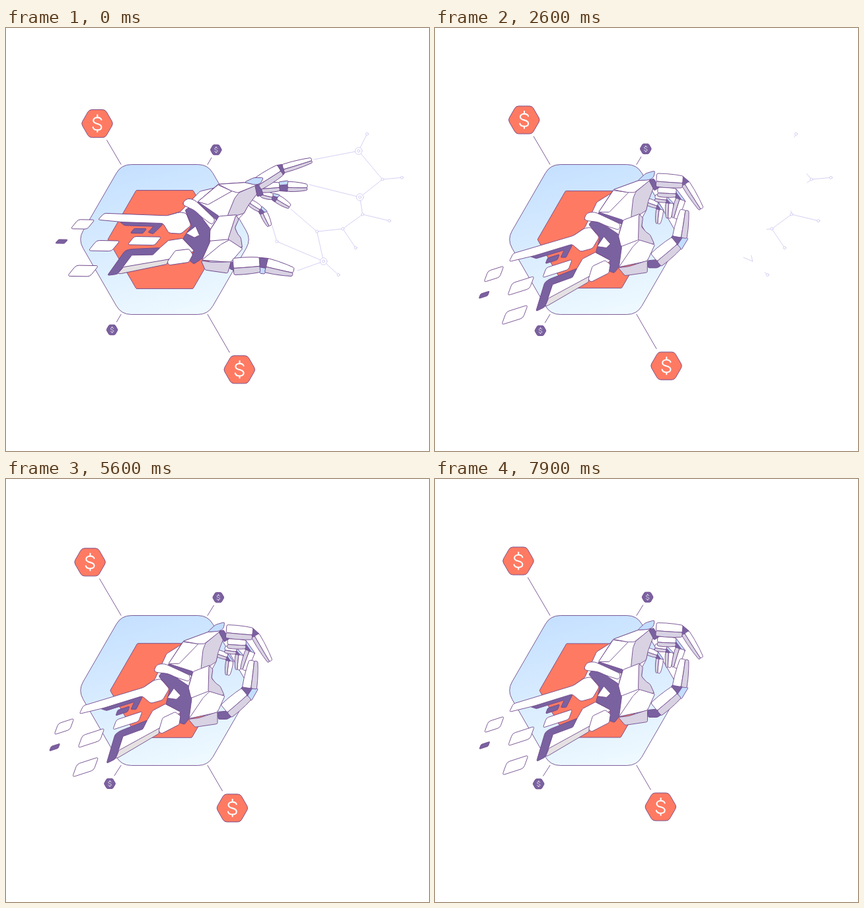
Animation of 640x640 px, one loop 8000 ms. Source, as an HTML page:

```html
<!DOCTYPE html>
<html lang="en">
<head>
<meta charset="utf-8">
<title>Robot hand</title>
<style>
html, body { margin: 0; width: 100%; height: 100%; overflow: hidden; background: #fff; }
svg { display: block; width: 100%; height: 100%; stroke-linejoin: round; stroke-linecap: round; }
.ink { stroke: #70498c; stroke-width: .9; }
.net { stroke: #cbc4f0; stroke-width: .8; fill: #fff; }
</style>
</head>
<body>
<svg id="stage" viewBox="0 0 640 640">
  <defs>
    <linearGradient id="sky" x1=".3" y1="0" x2=".6" y2="1">
      <stop offset="0" stop-color="#c5e0ff"/>
      <stop offset="1" stop-color="#eef9ff"/>
    </linearGradient>
  </defs>
</svg>
<script>
const LOOP = 8000;
const WHITE = '#fff', GRAY = '#d8d2e3', PALE = '#e5e1e2', PURPLE = '#7a61a0', BLUE = '#c3ddff', ORANGE = '#ff7a62';
const stage = document.getElementById('stage');

function set(node, attrs) {
  for (const key in attrs) node.setAttribute(key, attrs[key]);
}
function add(parent, tag, attrs = {}) {
  const node = document.createElementNS('http://www.w3.org/2000/svg', tag);
  set(node, attrs);
  return parent.appendChild(node);
}
const show = (node, visible) => set(node, { visibility: visible ? 'visible' : 'hidden' });

const mix = (a, b, k) => a + (b - a) * k;
const mixPoint = (p, q, k) => [mix(p[0], q[0], k), mix(p[1], q[1], k)];
const span = (t, start, length) => Math.min(1, Math.max(0, (t - start) / length));
const ease = k => (1 - Math.cos(Math.PI * k)) / 2;

// Eased value through [time, value] keys
function track(t, ...keys) {
  return keys.slice(1).reduce((value, [t1, v1], i) => {
    const [t0, v0] = keys[i];
    return t < t0 ? value : mix(v0, v1, ease(span(t, t0, t1 - t0)));
  }, keys[0][1]);
}

// Point reached by walking along a heading (degrees) and then sideways, clockwise positive
function step([x, y], heading, along, side = 0) {
  const a = heading * Math.PI / 180, c = Math.cos(a), s = Math.sin(a);
  return [x + along * c - side * s, y + along * s + side * c];
}

// Closed polygon with softened corners
function outline(points, r = 2) {
  const n = points.length;
  const text = p => p.map(v => v.toFixed(2)).join();
  return points.map((p, i) => {
    const toward = q => mixPoint(p, q, Math.min(r / (Math.hypot(q[0] - p[0], q[1] - p[1]) || 1), .5));
    const enter = toward(points[(i + n - 1) % n]), leave = toward(points[(i + 1) % n]);
    return `${i ? 'L' : 'M'}${text(enter)}Q${text(p)} ${text(leave)}`;
  }).join('') + 'Z';
}
const hexagon = (cx, cy, radius) => [180, 240, 300, 0, 60, 120].map(a => step([cx, cy], a, radius));

// Backdrop
add(stage, 'path', { d: outline(hexagon(240, 320, 131), 15), fill: 'url(#sky)', class: 'ink' });
const core = add(stage, 'path', { fill: ORANGE, class: 'ink' });

// Coins drift along spokes anchored at the big hexagon
function coin(from, to, anchor, gap, scale, fill) {
  const spoke = add(stage, 'line', { x1: anchor[0], y1: anchor[1], class: 'ink' });
  const group = add(stage, 'g');
  add(group, 'path', { d: outline(hexagon(0, 0, 24.3 * scale), 4 * scale), fill, class: 'ink' });
  add(group, 'path', {
    d: 'M6.4-5.7C5.4-8 3-9.2.3-9.2C-3.6-9.2-5.8-7-5.8-4.6C-5.8-1.6-3.6-.7.3.3C4.2 1.3 6.4 2.6 6.4 5.3C6.4 8 4 9.7.3 9.7C-3 9.7-5.6 8.2-6.4 5.6M.3-13V-9.2M.3 9.7V12.7',
    fill: 'none', stroke: '#fff', 'stroke-width': 2.1, transform: `scale(${scale})`
  });
  return k => {
    const [x, y] = mixPoint(from, to, k);
    const [x2, y2] = step([x, y], anchor[1] > y ? 60 : 240, gap * (anchor[0] > x === anchor[1] > y ? 1 : 0));
    const end = x2 === x ? step([x, y], anchor[1] > y ? 120 : 300, gap) : [x2, y2];
    set(group, { transform: `translate(${x} ${y})` });
    set(spoke, { x2: end[0], y2: end[1] });
  };
}
const coins = [
  coin([138, 144.6], [126, 124], [174, 206.3], 29, 1, ORANGE),
  coin([353.2, 516.8], [341.3, 496], [305, 433.3], 30, 1, ORANGE),
  coin([317.8, 184.3], [321.6, 178.8], [305, 206.5], 14, .36, PURPLE),
  coin([160.5, 456.7], [156.7, 461.3], [174, 433.3], 14, .36, PURPLE)
];

// Network: [x, y, depth, ringed]; depth 0 sits at the fingertips
const nodes = {
  index: [466, 199, 0], middle: [459, 237, 0], ring: [431, 274, 0], pinky: [402.5, 298, 0], thumb: [441, 367, 0],
  a: [533.5, 186, 1, 1], b: [535.5, 256, 1, 1], c: [470.5, 308, 1], d: [480.5, 353, 1, 1], e: [409.8, 323, 1],
  f: [546.3, 160.3, 2], g: [569.5, 229, 2], h: [539.5, 282, 2], i: [509.6, 303.8, 2], j: [503, 373.5, 2],
  k: [599, 226.3, 3], l: [580, 291.7, 3], m: [529, 332.6, 3]
};
const net = add(stage, 'g', { class: 'net' });
const links = 'index-a middle-b ring-c pinky-e thumb-d a-f a-g b-g b-h c-i c-d e-d d-j g-k h-l i-m h-i'
  .split(' ').map(pair => {
    const [p, q] = pair.split('-').map(name => nodes[name]);
    return { p, q, line: add(net, 'line', { x2: q[0], y2: q[1] }) };
  });
const dots = Object.values(nodes).filter(node => node[2]).map(([x, y, depth, ringed]) => {
  const group = add(net, 'g');
  if (ringed) add(group, 'circle', { r: 5.3 });
  add(group, 'circle', { r: 2 });
  return { x, y, depth, group };
});
function drawNet(t) {
  for (const { p, q, line } of links) {
    const k = span(t, 1690 + 500 * p[2], 510);
    const [x1, y1] = mixPoint(p, q, k);
    set(line, { x1, y1 });
    show(line, k < 1);
  }
  for (const { x, y, depth, group } of dots) {
    const scale = 1 - ease(span(t, 1550 + 650 * depth, 400));
    set(group, { transform: `translate(${x} ${y}) scale(${scale})` });
    show(group, scale > 0);
  }
}

// The hand is drawn in its grasping pose; REACH places that drawing for the open pose
const PIVOT = [197, 380.5], REACH = { x: 212, y: 342.25, turn: 19 };
const WRIST = [265, 300], BEND = -2.5;
const rotateAbout = (p, center, angle) => step(center, angle, p[0] - center[0], p[1] - center[1]);
const toHandSpace = ([x, y]) =>
  rotateAbout([x - REACH.x + PIVOT[0], y - REACH.y + PIVOT[1]], PIVOT, -REACH.turn);
const toPalmSpace = p => rotateAbout(toHandSpace(p), WRIST, -BEND);

const hand = add(stage, 'g', { class: 'ink' });
const movers = [];
function part(parent, fill, points, r) {
  const list = points.split(' ').map(pair => pair.split(',').map(Number));
  return add(parent, 'path', { fill, d: outline(list, r) });
}

// Slanted plate along the forearm
function plate(fill, grasp, reach, width, height) {
  const path = add(hand, 'path', { fill });
  const open = toHandSpace(reach);
  movers.push(grip => {
    const center = mixPoint(open, grasp, grip);
    const corner = (u, v) => step(step(center, -18, u * width / 2), 110, v * height / 2);
    set(path, { d: outline([corner(-1, -1), corner(1, -1), corner(1, 1), corner(-1, 1)], height / 5) });
  });
}
plate(WHITE, [88, 374], [116, 297], 25, 18);
plate(PURPLE, [73.5, 405.5], [84, 323], 14, 7.5);
plate(WHITE, [129, 391.5], [148.5, 329.5], 35, 20);
plate(WHITE, [120, 435.5], [116.5, 367.5], 34, 21);

// Forearm
part(hand, WHITE, '208,315 225,303 243,264 262,252 270,246 258,268 244,282 246,300 232,305');
part(hand, PURPLE, '143,347 204,327 206,330 197,348 189,348 194,337 152,350', 1);
plate(PURPLE, [176.5, 350.5], [200.5, 307], 19, 9);
part(hand, WHITE, '111,355 117,342.5 208,315 224,304 234,302 247,317 237,334 219,339 206,328 148,346', 3);
part(hand, PURPLE, '152,430 165,386 172,381 215,364 207,379 177,389 166,423', 3);
part(hand, WHITE, '167,420 177,389 207,378 214,364 222,350 241,340 265,352 234,376', 1);
part(hand, PALE, '166,422 171,410 233,376 231,385 170,421', 1);
plate(WHITE, [184, 365], [209.5, 322], 41, 16);

// Wrist
part(hand, PURPLE, '231,298 246,280 256,274 285,290 277,315 281,332 298,330 277,362 270,371 262,368 264,352 242,340 248,317');
part(hand, WHITE, '254,316 264,327 258,333 244,331', 1);
part(hand, WHITE, '264,290 281,297 277,313 259,301', 1);
part(hand, WHITE, '224,288 229,280 240,279 262,289 279,297 277,306 258,300 245,294 226,292', 4);
part(hand, WHITE, '231,381 237,361 256,352 264,358 262,371 235,385');

const palm = add(hand, 'g');

// Two bones and a joint; the clockwise side of each bone is shaded
function finger({ reach, grasp, lengths, open, closed, girth, cap }) {
  const [nearLength, gap, farLength] = lengths, [nearWidth, farWidth] = girth;
  const base = toPalmSpace(reach);
  const rest = open.map(a => a - REACH.turn - BEND);
  const [joint, knuckle, ...shells] = [PURPLE, BLUE, WHITE, GRAY, WHITE, GRAY]
    .map(fill => add(palm, 'path', { fill }));
  const strip = (p, heading, length, w0, w1, from, to) => {
    const edge = side => [0, .35, .7, 1].map(u =>
      step(p, heading, u * length, side * (mix(w0, w1, u) + Math.sin(Math.PI * u))));
    return outline([...edge(from), ...edge(to).reverse()], 2);
  };
  movers.push(grip => {
    const start = mixPoint(base, grasp, grip);
    const [a, b] = rest.map((angle, i) => mix(angle, closed[i], grip));
    const end = step(start, a, nearLength), next = step(end, (a + b) / 2, gap);
    const near = side => step(end, a, -1, side * nearWidth * .9);
    const far = side => step(next, b, 1, side * farWidth);
    const bones = [[start, a, nearLength, nearWidth, nearWidth * .9], [next, b, farLength, farWidth, farWidth * .6]];
    bones.forEach((bone, i) => {
      set(shells[2 * i], { d: strip(...bone, -1, .2) });
      set(shells[2 * i + 1], { d: strip(...bone, .2, 1) });
    });
    set(joint, { d: outline([near(-1), far(-1), far(1), near(1)], 1) });
    if (cap) set(knuckle, { d: outline([near(cap * .3), near(cap * 1.15), far(cap * 1.2), far(cap * .4)], 2) });
  });
}
finger({ reach: [369, 264], grasp: [317, 262], lengths: [19, 7, 22], open: [33, 65], closed: [20, 97], girth: [5, 5.5], cap: -1 });
finger({ reach: [386, 251], grasp: [331, 257], lengths: [18, 7, 23], open: [14, 32], closed: [8, 94], girth: [5, 6], cap: -1 });
finger({ reach: [386, 242], grasp: [335, 248], lengths: [28, 12, 30], open: [-4, 2], closed: [3, 108], girth: [7, 7.5], cap: -1 });

// Palm
part(palm, WHITE, '246,279 268,245 306,231 326,229 318,276 312,287 311,301 330,326 320,352 277,362 281,332 277,310 283,291', 1);
part(palm, WHITE, '246,279 268,246 291,249 262,279', 1);
part(palm, WHITE, '268,245 306,231 326,229 300,249 290,249');
part(palm, GRAY, '295,287 298,258 302,248 325,229 329,241 321,262 318,276 309,282');
part(palm, WHITE, '283,291 309,281 307,300 308,320 280,331 276,315');
part(palm, GRAY, '307,282 313,287 311,301 318,309 324,313 330,326 323,328 306,321');
part(palm, WHITE, '277,362 298,331 308,321 331,328 322,348 319,353', 1);
part(palm, GRAY, '276,363 292,361 320,352 320,370 286,375');
part(palm, PURPLE, '321,363 320,352 341,350 346,356 335,363');
part(palm, PURPLE, '322,231 329,228 338,241 330,246', 1);

finger({ reach: [381, 236], grasp: [333, 230], lengths: [40, 5, 45], open: [-32, -16.5], closed: [4, 58], girth: [10, 6.5] });
part(palm, BLUE, '305,231 317,220 331,216 329,226 322,230', 3);
finger({ reach: [344, 361], grasp: [333, 351], lengths: [40, 10, 42], open: [-4, 14], closed: [-40, -80], girth: [12.5, 11], cap: 1 });

function drawHand(t) {
  const swing = ease(span(t, 1200, 1550));
  const x = REACH.x - 15 * swing ** 3 + track(t, [6400, 0], [7900, 1.5]);
  const y = mix(REACH.y, PIVOT[1], swing) + track(t, [3500, 0], [4700, .7], [6400, .2], [7900, -2.5]);
  const turn = REACH.turn * (1 - swing);
  set(hand, { transform: `translate(${x} ${y}) rotate(${turn}) translate(${-PIVOT[0]} ${-PIVOT[1]})` });
  set(palm, { transform: `rotate(${track(t, [1900, BEND], [2750, 0])} ${WRIST})` });

  const grip = track(t, [0, 0], [1200, .02], [2200, 1], [3500, 1], [4700, 1.03], [6400, 1.02], [7900, 1]);
  movers.forEach(move => move(grip));
}

function render(t) {
  const drift = ease(span(t, 350, 6500));
  set(core, { d: outline(hexagon(240, 320, mix(86, 82, drift)), 1) });
  coins.forEach(move => move(drift));
  drawNet(t);
  drawHand(t);
}

const start = performance.now();
function tick() {
  render((performance.now() - start) % LOOP);
  requestAnimationFrame(tick);
}
tick();
</script>
</body>
</html>
```
